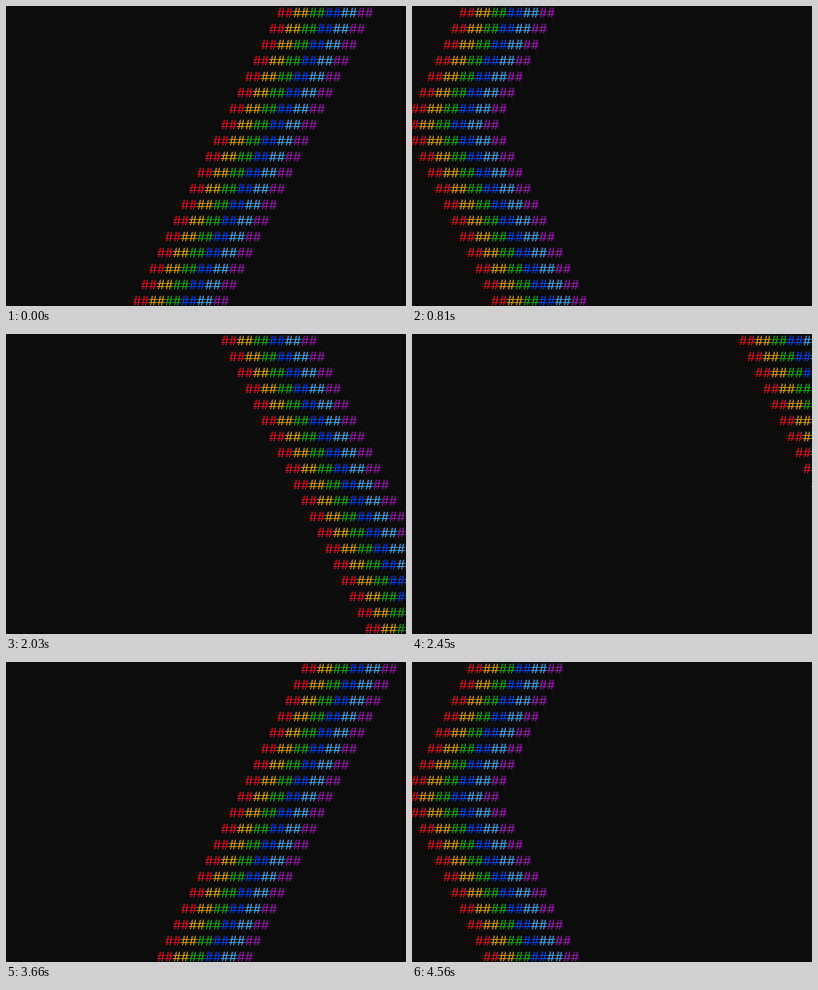
Write an HTML page with a canvas that moves like this. It is 400 px wide and 300 px high and loops after 4610 ms.

```html
<!DOCTYPE html>
<html lang="en">
<head>
<meta charset="utf-8">
<title>Rainbow zigzag</title>
<style>
  html, body { margin: 0; width: 100%; height: 100%; overflow: hidden; background: #0c0c0c; }
  canvas { display: block; }
</style>
</head>
<body>
<canvas id="terminal" width="400" height="300"></canvas>
<script>
const LOOP = 4610;
const BEAT = 133; // usual time between two screen updates
const CELL = 8, LINE = 16, ROWS = 19, MAX_INDENT = 60, FIRST_ROW = 85;
const COLORS = ['#d8101f', '#d6a000', '#14a510', '#003fe4', '#48a5ec', '#921aa4'];

// Scroll pace as a few key points: [time in ms, lines scrolled]
const PACE = [
  [0, 0], [520, 18], [810, 28], [1320, 44], [1740, 54],
  [2450, 77], [3130, 100], [3790, 122], [4150, 134], [4560, 147]
];

const ctx = document.getElementById('terminal').getContext('2d', { alpha: false });

// Between key points the screen jumps ahead in equal beats, by whole lines.
function linesAt(time) {
  const next = PACE.findIndex(([at]) => at > time);
  if (next < 0) return PACE[PACE.length - 1][1];
  const [t0, from] = PACE[next - 1];
  const [t1, to] = PACE[next];
  const beats = Math.round((t1 - t0) / BEAT);
  const beat = Math.floor((time - t0) * beats / (t1 - t0));
  return Math.floor(from + (to - from) * beat / beats + 0.35);
}

// Triangle wave: the indent grows to MAX_INDENT and shrinks back to zero.
function indentOf(row) {
  const phase = row % (2 * MAX_INDENT);
  return Math.min(phase, 2 * MAX_INDENT - phase);
}

function drawLine(indent, y) {
  COLORS.forEach((color, band) => {
    ctx.fillStyle = ctx.strokeStyle = color;
    for (let i = 0; i < 2; i++) {
      // The first terminal column lies just outside the left edge.
      const x = (indent - 1 + band * 2 + i) * CELL - 1;
      ctx.fillText('#', x, y + 11);
      ctx.strokeText('#', x, y + 11);
    }
  });
}

function draw(scrolled) {
  ctx.fillStyle = '#0c0c0c';
  ctx.fillRect(0, 0, 400, 300);
  ctx.font = '13.333px "Liberation Mono", monospace';
  ctx.lineWidth = 0.35;
  for (let r = 0; r < ROWS; r++) {
    drawLine(indentOf(FIRST_ROW + scrolled + r), r * LINE);
  }
}

let shown = -1;
const start = performance.now();

function tick() {
  const scrolled = linesAt((performance.now() - start) % LOOP);
  if (scrolled !== shown) draw(shown = scrolled);
  requestAnimationFrame(tick);
}
tick();
</script>
</body>
</html>
```
